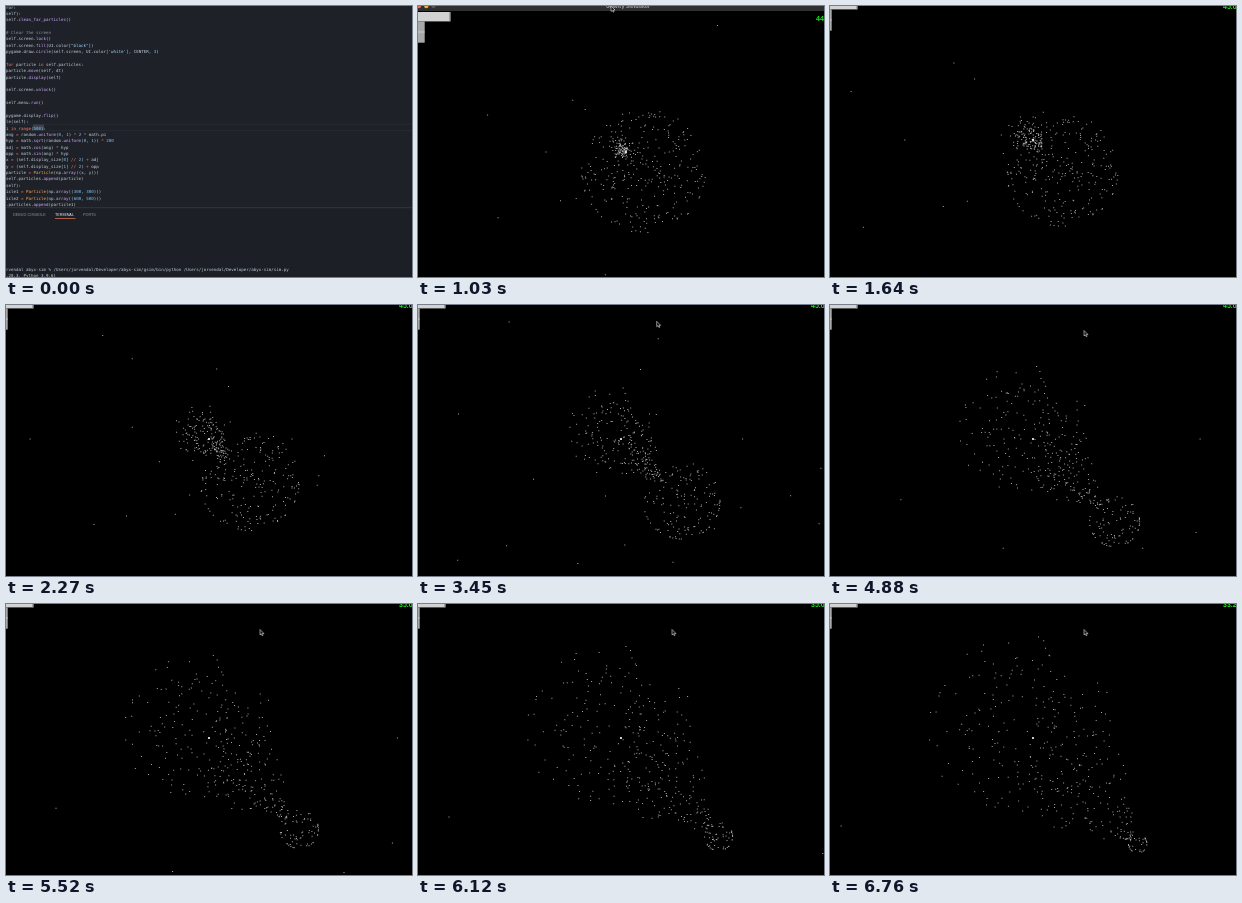
Write an HTML page that moves like this. It is 406x271 px and loops after 6.79 s.

```html
<!DOCTYPE html>
<html lang="en">
<head>
<meta charset="utf-8">
<title>Gravity particles</title>
<style>
  html, body { margin: 0; width: 100%; height: 100%; overflow: hidden; background: #000; }
  svg { display: block; width: 100vw; height: 100vh; }
  .code { font: 4.17px "DejaVu Sans Mono", monospace; fill: #c3cdd8; white-space: pre; }
  .tabs { font: 3.75px "Liberation Sans", sans-serif; fill: #8b949e; }
  .title { font: bold 5.2px Inter, sans-serif; fill: #a8a8a8; }
  .fps { font: bold 7px "Liberation Sans", sans-serif; fill: #22e822; }
</style>
</head>
<body>
<svg viewBox="0 0 406 271" preserveAspectRatio="none">
  <g id="editor">
    <rect width="406" height="271" fill="#1e2228"/>
    <path d="M0 118.4H406M0 124.6H406" stroke="#2b3038" stroke-width=".6"/>
    <rect x="27" y="118.6" width="11" height="5.8" fill="#3a4350"/>
    <g id="code" class="code"></g>
    <rect y="201.5" width="406" height="70" fill="#1c2026"/>
    <path d="M0 201.7H406" stroke="#3a4048" stroke-width=".7"/>
    <g class="tabs">
      <text x="7" y="209.6">DEBUG CONSOLE</text>
      <text x="49" y="209.6" fill="#e6edf3">TERMINAL</text>
      <text x="77" y="209.6">PORTS</text>
    </g>
    <path d="M49 212.5H69.5" stroke="#ec775c" stroke-width=".7"/>
    <text class="code" x="0" y="265.4">rvendal abyx-sim % /Users/jorvendal/Developer/abyx-sim/gsim/bin/python /Users/jorvendal/Developer/abyx-sim/sim.py</text>
    <text class="code" x="0" y="270.7">.28.3, Python 3.9.6)</text>
  </g>
  <g id="sim">
    <rect width="406" height="271"/>
    <g id="win">
      <rect x="-20" y="-24" width="440" height="17" fill="#303030"/>
      <circle cx="-4" cy="-12" r="2.2" fill="#ed6a5e"/>
      <circle cx="3.3" cy="-12" r="2.2" fill="#f0b23c"/>
      <circle cx="10.5" cy="-12" r="2.2" fill="#555"/>
      <text class="title" x="183" y="-10">Gravity Simulator</text>
      <rect x="-10" y="-6" width="37.5" height="9.4" fill="#d2d2d2"/>
      <rect x="-10" y="3.4" width="11.7" height="21.3" fill="#a9a9a9"/>
      <path d="M-10 14H1.7" stroke="#d8d8d8" stroke-width=".8"/>
      <path d="M26.7 -6V3.4" stroke="#888" stroke-width=".8"/>
      <text id="fps" class="fps" x="393" y="3"></text>
      <path id="dots" fill="#aaa"/>
      <circle cx="203" cy="134" r="1.1" fill="#fff"/>
    </g>
    <path id="cursor" d="M0 0V5.4L1.3 4.3L2.2 6.2L3.1 5.8L2.3 4H4Z" fill="#111" stroke="#ddd" stroke-width=".6"/>
  </g>
</svg>
<script>
const LOOP = 6790, STEP = 0.03, COUNT = 390, STRAYS = 26;
const STEPS = Math.ceil(LOOP / 1000 / STEP);
const CENTER = { x: 203, y: 134 };
const $ = id => document.getElementById(id);

const CODE = `ror:
self):
    self.clean_far_particles()

# Clear the screen
self.screen.lock()
self.screen.fill(UI.color["black"])
pygame.draw.circle(self.screen, UI.color['white'], CENTER, 3)

for particle in self.particles:
    particle.move(self, dt)
    particle.display(self)

self.screen.unlock()

self.menu.run()

pygame.display.flip()
le(self):
i in range(500):
ang = random.uniform(0, 1) * 2 * math.pi
hyp = math.sqrt(random.uniform(0, 1)) * 200
adj = math.cos(ang) * hyp
opp = math.sin(ang) * hyp
x = (self.display_size[0] // 2) + adj
y = (self.display_size[1] // 2) + opp
particle = Particle(np.array((x, y)))
self.particles.append(particle)
self):
icle1 = Particle(np.array((300, 300)))
icle2 = Particle(np.array((600, 500)))
.particles.append(particle1)`;
const TOKENS = [
  [/^#.*/, '#8b949e'], [/^(["']).*?\1/, '#a5d6ff'], [/^(for|in|range)\b/, '#ff7b72'],
  [/^Particle\b/, '#ffa657'], [/^[a-z_]+(?=\()/, '#d2a8ff'], [/^\d+/, '#79c0ff'],
  [/^(=|\*|\/\/|\+)/, '#ff7b72'], [/^\w+/, ''], [/^./, '']
];

function colorize(line) {
  let html = '';
  while (line) {
    const [rule, color] = TOKENS.find(([re]) => re.test(line));
    const word = line.match(rule)[0];
    html += color ? `<tspan fill="${color}">${word}</tspan>` : word;
    line = line.slice(word.length);
  }
  return html;
}
$('code').innerHTML = CODE.split('\n').map((line, row) =>
  `<text x="0" y="${(2.5 + 6.37 * row).toFixed(2)}">${colorize(line)}</text>`).join('');

let seed = 20117;
function random() {
  seed = (seed * 1664525 + 1013904223) >>> 0;
  return seed / 4294967296;
}
// Random point of the unit disc outside a hole of the given squared radius
function inDisc(hole = 0) {
  const angle = random() * 2 * Math.PI, r = Math.sqrt(hole + (1 - hole) * random());
  return { x: Math.cos(angle) * r, y: Math.sin(angle) * r };
}

// Shrinking disc that drifts down the diagonal; its sink starts at the centre and ends on the rim
function discAt(t) {
  const x = 199 + 21.5 * t - 0.8 * t * t;
  const r = 9 + 64 * Math.max(0, 1 - t / 6.79) ** 1.1;
  const rim = r * Math.SQRT1_2;
  const gap = Math.min(x - 200 - 16 * Math.max(0, t - 1), rim);
  return { x, y: x - 68, r, rim: gap / rim, sinkX: x - gap, sinkY: x - 68 - gap };
}

// One step: part of the shrinking is a flow into the sink, the rest is plain scaling.
// Returns true once the particle has reached the sink.
function moveInDisc(p, t) {
  const DRAIN = 0.75;
  const a = discAt(t), b = discAt(t + STEP);
  const dx = a.sinkX - p.x, dy = a.sinkY - p.y;
  const pull = DRAIN * (1 + a.rim ** 4) * a.r * (a.r - b.r) / (dx * dx + dy * dy);
  const scale = (1 - DRAIN) * (1 - b.r / a.r);
  p.x += dx * Math.min(1, pull) + (a.x - p.x) * scale + b.x - a.x;
  p.y += dy * Math.min(1, pull) + (a.y - p.y) * scale + b.y - a.y;
  const ox = p.x - b.x, oy = p.y - b.y;
  const keep = Math.min(1, b.r / Math.hypot(ox, oy));
  p.x = b.x + ox * keep;
  p.y = b.y + oy * keep;
  return pull >= 1 || Math.hypot(p.x - b.sinkX, p.y - b.sinkY) < 2;
}

// Each particle keeps its path inside the disc, then flies straight away from the sink
function makeParticle() {
  const u = inDisc(), spread = inDisc(0.06), start = discAt(0);
  const p = { x: start.x + u.x * start.r, y: start.y + u.y * start.r };
  const path = [];
  let gone = false;
  while (!gone && path.length < STEPS) {
    path.push([p.x, p.y]);
    gone = moveInDisc(p, path.length * STEP - STEP);
  }
  const left = (path.length - 1) * STEP, speed = 14 + left;
  return { path, left, vx: spread.x * speed - 2, vy: spread.y * speed - 2 };
}

// Fast escapers, thrown out of the centre early on
function makeStray() {
  const angle = random() * 2 * Math.PI, speed = 32 + 50 * random();
  return {
    path: [], left: 3.4 * random() - 1.2,
    vx: Math.cos(angle) * speed, vy: Math.sin(angle) * speed
  };
}
const particles = Array.from({ length: COUNT }, makeParticle);
const strays = Array.from({ length: STRAYS }, makeStray);

function place({ path, left, vx, vy }, n) {
  if (n < path.length) return path[n];
  const age = Math.max(0, n * STEP - left);
  const [x, y] = path.length ? path[path.length - 1] : [CENTER.x, CENTER.y];
  return [x + vx * age, y + vy * age];
}

const dot = ([x, y]) => `M${(x - 0.5).toFixed(1)} ${(y - 0.5).toFixed(1)}h1v1h-1z`;
const ease = (t, from, to) => {
  const k = Math.max(0, Math.min(1, (t - from) / (to - from)));
  return k * k * (3 - 2 * k);
};

// The pointer grabs the title bar, drags it off the top, then comes back to rest
function cursorAt(t) {
  const grab = 1 - ease(t, 0.4, 0.95), drag = ease(t, 1.03, 1.6), back = ease(t, 2.9, 3.7);
  return [193 - 25 * grab - 5 * drag + 66 * back, 45 * grab - 14 * drag + 39.5 * back];
}

function draw(ms) {
  const n = Math.floor(ms / 30), t = n * STEP;
  $('sim').style.display = n < 1 ? 'none' : '';
  const off = 1 - ease(t, 1.04, 1.6);
  $('win').setAttribute('transform', `translate(${5 * off} ${12 * off})`);
  $('dots').setAttribute('d', [...particles, ...strays].map(p => dot(place(p, n))).join(''));
  $('fps').textContent = t < 1.2 ? '44.2' : t < 5 ? '45.0' : t < 6.2 ? '35.0' : '33.2';
  $('cursor').setAttribute('transform', `translate(${cursorAt(t)})`);
}

const began = performance.now();
function tick() {
  draw((performance.now() - began) % LOOP);
  requestAnimationFrame(tick);
}
tick();
</script>
</body>
</html>
```
